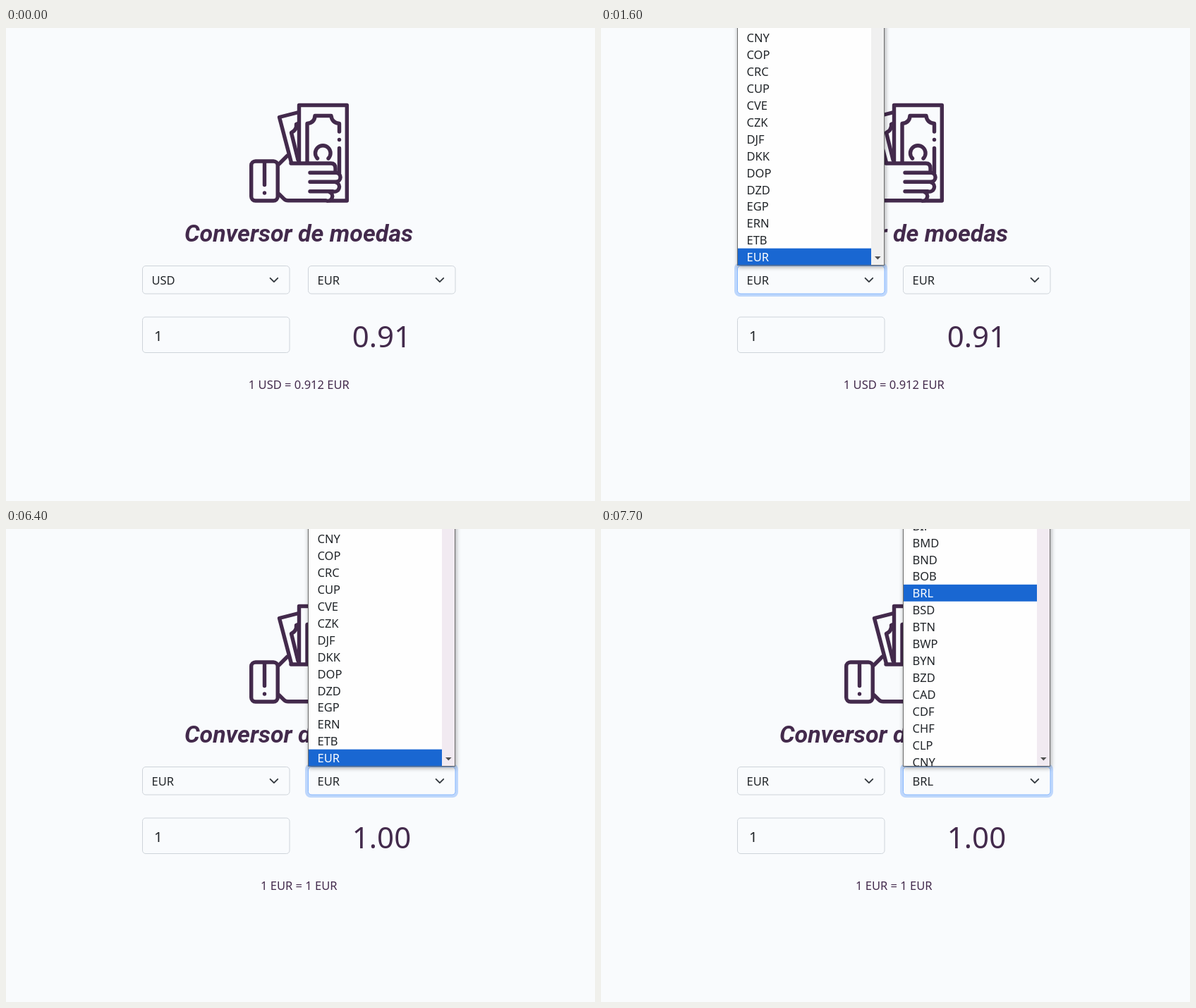
These frames come from a looping animation (835 px wide and 671 px high, 8000 ms). An HTML page:

```html
<!DOCTYPE html>
<html lang="pt">
<head>
<meta charset="utf-8">
<title>Conversor de moedas</title>
<style>
  html, body { margin: 0; width: 100%; height: 100%; overflow: hidden; background: #f9fbfd; }
  svg { display: block; }
  text { font: 16.5px "Noto Sans", "Open Sans", sans-serif; fill: #212529; }
  .title { font: italic 700 34px Roboto, sans-serif; }
  .title, .result, .rate { fill: #432a4c; text-anchor: middle; }
  .result { font-size: 42px; }
  .amount { font-size: 20.5px; }
  .icon { fill: none; stroke: #432a4c; stroke-width: 5.4; stroke-linecap: round; stroke-linejoin: round; }
  .box { fill: #f9fbfd; stroke: #ced4da; }
  .ring { fill: #bed7fc; visibility: hidden; }
  .focus .ring { visibility: visible; }
  .focus .box { stroke: #86b7fe; }
  .chevron { fill: none; stroke: #343a40; stroke-width: 1.9; stroke-linecap: round; stroke-linejoin: round; }
  .menu { visibility: hidden; filter: drop-shadow(1px 2px 3px rgba(0, 0, 0, .36)); }
  .open .menu { visibility: visible; }
  .sheet { fill: #fefefe; stroke: #6b6b6b; }
  .track { fill: #f0f0f0; }
  #to .track { fill: #f1eaf1; }
  .arrow { fill: #505050; }
  .mark { fill: #1967d2; }
  .on { fill: #fff; }
</style>
</head>
<body>
<svg width="835" height="671" viewBox="0 0 835 671">
  <defs>
    <clipPath id="view"><rect x="194" y="0" width="189" height="336.5"/></clipPath>
  </defs>

  <g class="icon">
    <!-- back note -->
    <path d="M413 120L387.5 126.5L404.5 191M414 135.500L411.500 136.500Q412.500 144.500 404.500 148.500L414 187"/>
    <!-- front note -->
    <path d="M415.500 191V109.500H483.300V245H459"/>
    <path d="M427 191V135.500Q437.500 134.500 438 124.500H461Q462 134.500 472.500 135.500V147M472.500 158.500h.01M472.500 170.500V206"/>
    <path d="M441.500 185A10.800 10.800 0 1 1 457 185"/>
    <!-- cuff and hand -->
    <rect x="347.700" y="189" width="37.500" height="56" rx="6"/>
    <path d="M366.500 190V222.500M366.500 234h.01M387 193L399 181"/>
    <path d="M404 192H460.500Q467 192 467 199V204M431 205.200H467.500A6.500 6.500 0 0 1 467.500 218.300H431"/>
    <path d="M468 219A6.400 6.400 0 0 1 463.500 231.700H431M458.500 232.500A6.200 6.200 0 0 1 453.500 244.800H400Q396.500 244.800 394 242.300L387 235.500"/>
  </g>

  <text class="title" x="415" y="303">Conversor de moedas</text>
  <rect class="box" x="193.500" y="410" width="208.500" height="50.500" rx="4.500"/>
  <text class="amount" x="210" y="443.800">1</text>
  <text class="result" id="result" x="532.500" y="452.500"></text>
  <text class="rate" id="rate" x="415.300" y="512.300"></text>
  <g id="from"></g>
  <g id="to" transform="translate(235 0)"></g>
</svg>
<script>
const codes = ("USD AED AFN ALL AMD ANG AOA ARS AUD AWG AZN BAM BBD BDT BGN BHD BIF BMD BND BOB BRL " +
  "BSD BTN BWP BYN BZD CAD CDF CHF CLP CNY COP CRC CUP CVE CZK DJF DKK DOP DZD EGP ERN ETB EUR").split(" ");
const rowH = 23.92, lastTop = 312.6, loop = 8000;
const byId = id => document.getElementById(id);

// menu: [open side, bottom code, highlighted code, scroll offset]
const states = [
  { at: 0, from: "USD", to: "EUR", sum: "0.91", rate: "1 USD = 0.912 EUR", focus: "", menu: null },
  { at: 700, focus: "from", menu: ["from", "BOB", "USD", 0] },
  { at: 1000, menu: ["from", "BOB", "BHD", 0] },
  { at: 1100, menu: ["from", "BOB", "BGN", 0] },
  { at: 1500, from: "EGP", menu: ["from", "EGP", "EGP", 0] },
  { at: 1600, from: "EUR", menu: ["from", "EUR", "EUR", 0] },
  { at: 2500, menu: null },
  { at: 2800, sum: "1.00", rate: "1 EUR = 1 EUR" },
  { at: 6400, focus: "to", menu: ["to", "EUR", "EUR", 0] },
  { at: 6600, menu: ["to", "EUR", "EGP", 0] },
  { at: 6700, menu: ["to", "EUR", "DZD", 0] },
  { at: 7600, to: "BAM", menu: ["to", "CNY", "BAM", 5.4] },
  { at: 7700, to: "BRL", menu: ["to", "CNY", "BRL", 5.4] }
];
for (let i = 1; i < states.length; i++) states[i] = { ...states[i - 1], ...states[i] };

for (const id of ["from", "to"]) byId(id).innerHTML = `
  <rect class="ring" x="189" y="333" width="217" height="48" rx="8"/>
  <rect class="box" x="193.500" y="337.500" width="208.500" height="39.500" rx="4.500"/>
  <text class="value" x="206.500" y="364.200"></text>
  <path class="chevron" d="M374.600 354.800l5.300 5.300 5.300-5.300"/>
  <g class="menu">
    <rect class="sheet" x="193.500" y="-20" width="208" height="356.500"/>
    <rect class="track" x="383" y="0" width="18" height="336"/>
    <path class="arrow" d="M388 324h8.600l-4.300 4.500z"/>
    <g class="rows" clip-path="url(#view)"></g>
  </g>`;

function rows([, bottom, lit, offset]) {
  const end = codes.indexOf(bottom);
  let out = "";
  for (let slot = -1; slot < 14; slot++) {
    const code = codes[end - 13 + slot];
    const top = lastTop + offset - (13 - slot) * rowH;
    const on = code === lit;
    if (on) out += `<rect class="mark" x="194" y="${top}" width="189" height="${rowH}"/>`;
    out += `<text class="${on ? "on" : ""}" x="206.500" y="${top + 18.6}">${code}</text>`;
  }
  return out;
}

function show(s) {
  byId("result").textContent = s.sum;
  byId("rate").textContent = s.rate;
  for (const id of ["from", "to"]) {
    const field = byId(id), open = s.menu !== null && s.menu[0] === id;
    field.classList.toggle("focus", s.focus === id);
    field.classList.toggle("open", open);
    field.querySelector(".value").textContent = s[id];
    field.querySelector(".rows").innerHTML = open ? rows(s.menu) : "";
  }
}

const start = performance.now();
let current = null;
function tick() {
  const t = (performance.now() - start) % loop;
  const next = states.findLast(s => s.at <= t);
  if (next !== current) show(current = next);
  requestAnimationFrame(tick);
}
tick();
</script>
</body>
</html>
```
